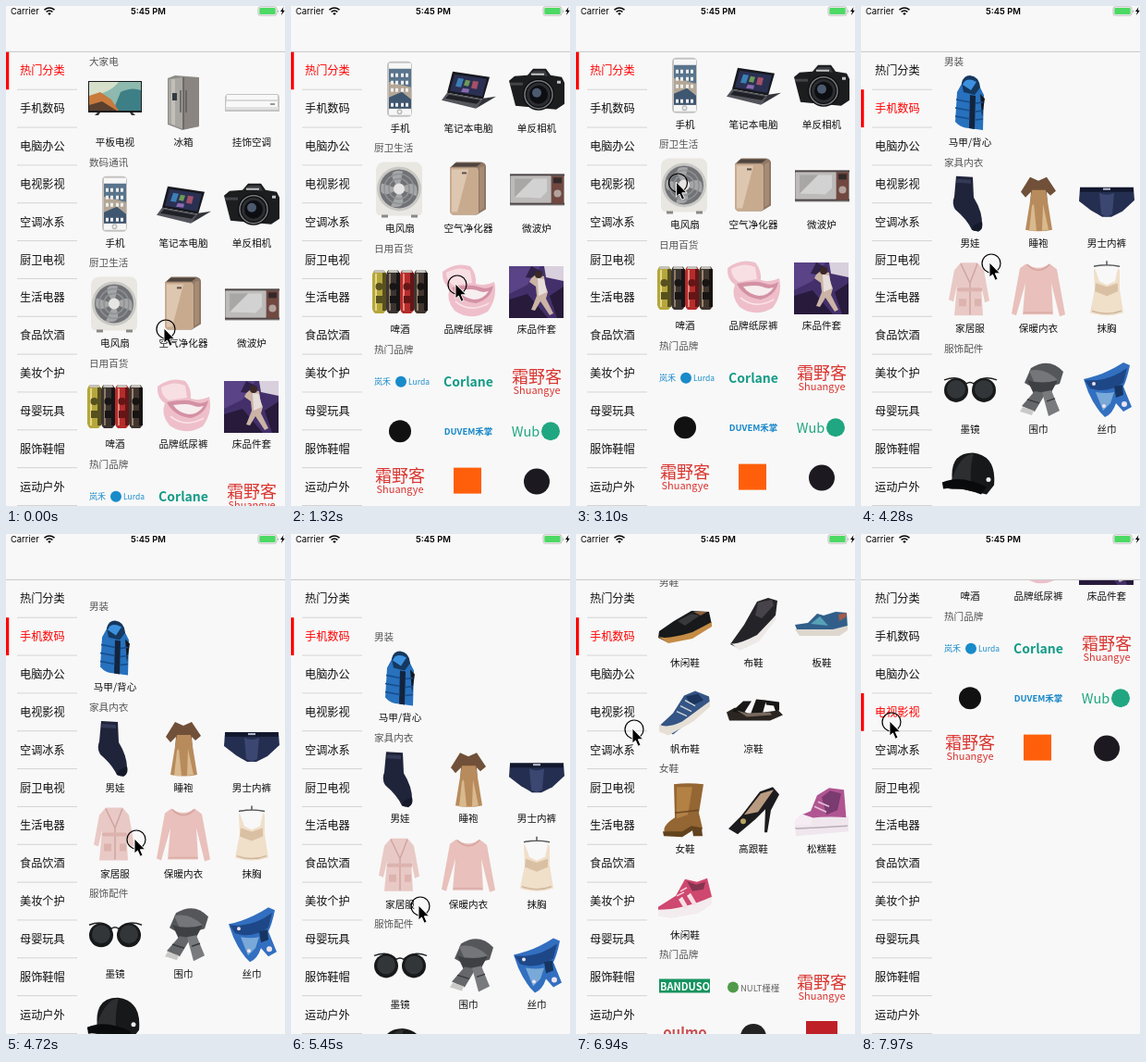
Write an HTML page that moves like this. It is 302 px wide and 540 px high and loops after 8000 ms.

```html
<!DOCTYPE html>
<html lang="zh">
<meta charset="utf-8">
<title>分类</title>
<style>
html, body { margin: 0; height: 100%; overflow: hidden; background: #f8f8f8 }
svg { display: block; width: 100vw; height: 100vh }
text { font-family: "Noto Sans CJK SC", "Noto Sans CJK", sans-serif }
.bar { font: 9.4px Inter, sans-serif }
</style>
<svg id="stage" viewBox="0 0 302 540">
  <clipPath id="clip"><path d="M78 50H302V540H78Z"/></clipPath>
  <g clip-path="url(#clip)"><g id="lists"></g></g>
  <g id="side"></g>
  <path d="M0 49.4H302" stroke="#b9b9b9" stroke-width=".8"/>
  <text class="bar" x="5" y="8.8">Carrier</text>
  <path d="M41.5 4.2Q47 -.3 52.5 4.2M43.6 6.4Q47 3.6 50.4 6.4" fill="none" stroke="#000" stroke-width="1.5"/>
  <path d="M45.2 8Q47 6.6 48.8 8L47 10Z"/>
  <text class="bar" x="154" y="8.8" text-anchor="middle" style="font-weight:600">5:45 PM</text>
  <rect x="273" y=".8" width="20" height="9.4" rx="2.2" fill="#f8f8f8" stroke="#a5a5a5" stroke-width=".7"/>
  <rect x="274.3" y="2" width="17.4" height="7" rx="1" fill="#4cd964"/>
  <path d="M294.2 4V7.5Q296 5.7 294.2 4Z" fill="#999"/>
  <path d="M300.5 1L297 6H299L298 10L301.8 4.7H299.6Z"/>
  <g id="cursor">
    <circle r="10" fill="none" stroke="#000" stroke-width="1.2"/>
    <path d="M-2 -1V15L1.5 12L4.2 18.2L7 17L4.3 10.8H9.5Z" stroke="#fff" stroke-width=".9"/>
  </g>
</svg>
<script>
const $ = id => document.getElementById(id);
const dot = (x, y, r) => `M${x - r} ${y}a${r} ${r} 0 1 0 ${2 * r} 0a${r} ${r} 0 1 0 ${-2 * r} 0Z`;
const box = (x, y, w, h) => `M${x} ${y}h${w}v${h}h${-w}Z`;
const text = (x, y, size, str, fill = '#111', anchor = 'middle', more = '') =>
  `<text x="${x}" y="${y + size * .37}" font-size="${size}" fill="${fill}" text-anchor="${anchor}" ${more}>${str}</text>`;
// A shape is "colour path"; "~colour" strokes instead of filling.
const shape = s => {
  const [, line, color, d] = s.match(/^(~?)(\S+) (.*)$/);
  return line ? `<path d="${d}" fill="none" stroke="${color}" stroke-width="1.5"/>` : `<path d="${d}" fill="${color}"/>`;
};

const can = (x, color, dark, light) => [`${color} M${x} -17Q${x + 1} -21 ${x + 3} -22H${x + 12}Q${x + 14} -21 ${x + 15} -17V20Q${x + 14} 24 ${x + 12} 25H${x + 3}Q${x + 1} 24 ${x} 20Z`,
  `${dark} ${box(x + 11, -19, 4, 41)}`, `${light} ${box(x + 3, -18, 2, 40)}`,
  `#c4c2bd M${x + 3} -22H${x + 12}L${x + 13} -19H${x + 2}Z`, `${dark} ${dot(x + 7.5, -4, 4)}${box(x + 4, 6, 7, 8)}`];

const art = {
  平板电视: ['#1b1b1e ' + box(-29, -24, 58, 34), '#8db9ae ' + box(-28, -23, 56, 31), '#d5dfc9 M-28 -23H4Q-6 -10 -28 -8Z',
    '#3d7f86 M6 -12Q18 -18 28 -14V8H-2Z', '#c87a3c M-28 -8L-16 -12L-4 -4L4 8H-28Z', '#59402f M-28 2L-14 -2L2 8H-28Z', '#333 M-19 10H-16L-18 13H-22ZM16 10H19L22 13H18Z'],
  冰箱: ['#8c8b89 M-17 -27L-9 -30L17 -28V25L-1 29L-17 23Z', '#aaa6a1 M-16 -26L0 -28V28L-16 22Z', '#8a8580 M1 -28L17 -27V25L1 28Z',
    '#c2beb8 M-13 -26H-9V24L-13 22Z', '~#5d5c5b M0 -28V28M-3 -14V10M3 -14V10', '#343a40 ' + box(-12, -11, 5, 8)],
  挂饰空调: ['#c4c4c4 M-27 -10H28Q30 -9 30 -6V9H-29V-7Z', '#f8f8f8 M-27 -9H28V4H-28Z', '#e0e0e0 M-28 4H29V7H-28Z', '~#cfcfcf M-28 -3H29', '#999 ' + box(20, 0, 5, 2)],
  手机: ['#c5c3c1 M-9 -30H8Q13 -30 13 -25V25Q13 30 8 30H-9Q-14 30 -14 25V-25Q-14 -30 -9 -30Z', '#f7f7f7 ' + box(-12, -28, 24, 56),
    '#59748c ' + box(-12, -22, 24, 43), '#b3a695 M-12 -8L12 -2V21H-12Z', '#3f5670 M-12 9L2 3L12 11V21H-12Z',
    '#eee ' + [-17, -9, -1, 15].map(y => [-10, -5, 1, 6].map(x => box(x, y, 3, 4)).join('')).join(''),
    '~#bbb ' + dot(-.5, 24.5, 2.2)],
  笔记本电脑: ['#17181d M-17 -19L23 -13L16 11L-23 4Z', '#2a3052 M-15 -16L20 -11L15 8L-20 2Z',
    '#3b7fb5 M-11 -12L-5 -11L-8 -2L-14 -3Z', '#6f9a58 M-3 -10L2 -9L0 -3L-5 -4Z', '#a4506a M5 -9L11 -8L9 0L3 -1Z', '#8a6ab0 M-6 -1L1 0L0 4L-8 3Z',
    '#55565d M-23 4L16 11L8 21L-29 12Z', '#202127 M-21 6L13 12L9 16L-25 10Z', '#33343b M16 10L30 8L8 21Z'],
  单反相机: ['#1c1d1f M-30 -9L-24 -14L-10 -15L-4 -22H10L15 -15L27 -13L30 -7V16L21 22L-23 18Z', '#3b3c40 M-8 -16L-3 -20H9L12 -14Z', '#434449 M-29 -7H-15V-4H-29Z',
    '#0b0c0d ' + dot(2, 6, 17), '~#77797d ' + dot(2, 6, 15), '#2b2d31 ' + dot(2, 6, 13), '#0d0e11 ' + dot(2, 6, 10), '#4c5a70 ' + dot(0, 4, 5), '#c4c4c4 ' + box(-6, -17, 14, 2) + box(22, -9, 4, 3)],
  电风扇: ['#e9e7e2 M-18 -30H18Q24 -28 24 -22V22Q24 28 19 28H-20Q-26 28 -26 22V-22Q-25 -29 -18 -30Z', '#c9c8c4 ' + dot(-1, -1, 24), '#707275 ' + dot(-1, -1, 21),
    '#a5a6a8 M-1 -1Q-18 -23 3 -20ZM-1 -1Q22 -15 18 7ZM-1 -1Q11 22 -10 18ZM-1 -1Q-25 13 -20 -7Z', '~#8f9194 ' + dot(-1, -1, 16) + dot(-1, -1, 11), '#e6e5e3 ' + dot(-1, -1, 6),
    '#8a8987 ' + box(-20, 27, 7, 3) + box(12, 27, 7, 3)],
  空气净化器: ['#8f7764 M-20 -24L-13 -30H14Q19 -29 19 -25V21L9 27H-17L-20 23Z', '#c8ab8f M-20 -24H8Q11 -24 11 -20V25L8 27H-17Q-20 26 -20 23Z',
    '#ddc7b1 M-18 -22H0L-12 24H-18Z', '#4f453f M-14 -29H14L9 -25H-18Z', '#a58a74 M12 -24L17 -26V20L12 23Z', '#5d4f45 ' + box(-7, -19, 5, 2)],
  微波炉: ['#9a9696 ' + box(-29, -17, 59, 34), '#4c4444 M-29 -17H30V-15H-29ZM-29 14H30V16H-29Z', '#bdbaba ' + box(-28, -15, 43, 29),
    '#d3d2d2 M-24 8L-4 -12H11V2L4 9Z', '#a9a6a6 M-24 -12H-4L-24 8Z', '#71483f ' + box(16, -15, 13, 30), '#33292a ' + box(18, -13, 9, 6), '#b2a29d ' + dot(22.5, 4, 4)],
  啤酒: [can(-30, '#b5a63c', '#57501f', '#e2d885'), can(-15, '#3a3431', '#171515', '#8f7b66'), can(0, '#b52c2b', '#641617', '#e28a7e'), can(15, '#40352f', '#171412', '#9a856e')].flat(),
  品牌纸尿裤: ['#eebfca M-28 -20Q-14 -31 2 -26Q9 -18 8 -7Q18 -4 28 -9Q32 8 21 23Q2 34 -15 22Q-25 10 -20 -2Q-29 -8 -28 -20Z', '#f8dfe4 M-24 -19Q-10 -27 2 -21L4 -8L-16 -5Q-24 -10 -24 -19Z',
    '#d391a4 M-18 -3Q2 -7 10 -4Q20 0 27 -5Q24 10 8 14Q-10 12 -18 -3Z', '#f7eef0 M-11 0Q4 -2 9 0Q15 3 22 1Q16 10 6 10Q-6 8 -11 0Z', '~#fae6eb M-14 12Q2 25 22 14'],
  床品件套: ['#43306b ' + box(-30, -26, 59, 56), '#5a4386 M-30 -26H4L-10 -6L-30 4Z', '#271a3b M-30 10L-10 4L12 30H-30ZM14 6L29 -4V30H22Z', '#2f2148 M-6 -26L6 -20L2 -12L-12 -14Z',
    '#d8d0dc M8 -26H29V-10L10 -14Z', '#cbb3a5 M-6 -13L-1 -17L8 -15L9 -6L12 2L10 9L18 25L14 27L4 12L-2 22L-6 21L0 6L-1 -4L-8 -9Z', '#e6dedb M1 -13L8 -12L11 2L2 6Z', '#3a2826 ' + dot(2, -17, 4)],
  '马甲/背心': ['#2771be M-8 -23L-14 -12L-16 20Q-10 27 -1 27L14 29L15 -9L9 -21Z', '#15385f M-9 -22Q-7 -30 0 -30Q10 -29 11 -17L5 -9L-7 -12Z', '#3c91df M-8 -20Q-4 -29 7 -23L1 -14Z',
    '#13243d M0 -9L6 -8L5 28L-1 27Z', '#15191f M11 -10L16 -5L13 15Z', '~#164c8c M-15 -4L0 -1M-16 5L0 8M-16 14L0 17M6 0L14 -1M6 9L14 8M6 18L14 17'],
  男娃: ['#20243a M-15 -30L3 -29L4 -7Q14 9 13 24Q9 32 2 28Q-3 17 -16 6Q-20 0 -17 -8Z', '#343a56 M-14 -27L1 -26V-22L-15 -23Z', '#151929 M4 23L13 19Q15 27 9 30L2 28Z'],
  睡袍: ['#705038 M-9 -29L0 -25L9 -29L19 -14L13 -9L9 -13L10 1H-9L-8 -13L-14 -7L-19 -13Z', '#b88b5c M-7 -15H8L15 28Q0 31 -14 28Z', '#d9b98e M-5 0L-2 29H-10L-7 2ZM5 0L11 28L4 29Z'],
  男士内裤: ['#242e50 M-29 -17H29L30 -4L17 8L5 14H-5L-17 7L-30 -3Z', '#12182e M-29 -18H29V-13H-29Z', '#3b4770 M-8 -12Q0 -8 8 -12L6 11L0 14L-6 11Z', '#b9bdd0 ' + box(-4, -17, 8, 2)],
  家居服: ['#e9c9c5 M-10 -29H8L15 -21L21 12L16 14L12 -5L14 28H-17L-14 -5L-18 13L-23 11L-17 -21Z', '~#cfa5a0 M-10 -28L0 -7L8 -28M-14 0H12M0 -7V27', '#dcb3ae ' + box(-13, -2, 26, 4) + box(-12, 10, 8, 8) + box(5, 10, 7, 8)],
  保暖内衣: ['#e9c0bb M-13 -28Q0 -19 12 -28L20 -22L29 27L23 29L14 -7L16 27H-17L-14 -7L-24 28L-29 26L-20 -23Z', '~#d5a29d M-12 -27Q0 -15 12 -27', '~#d9aba6 M-16 25H15'],
  抹胸: ['~#555 M-14 -25Q0 -28 14 -25M0 -26V-31', '#f0dfc9 M-13 -23L-8 -9L0 -5L9 -9L12 -23L14 -21L14 0L18 25Q0 31 -18 25L-13 0L-14 -21Z', '#dac0a3 M-12 -7L0 -3L12 -7L12 2L0 7L-13 2Z', '~#cfb79d M-16 23Q0 29 16 23'],
  墨镜: ['~#222 M-28 -11Q-12 -17 -4 -7Q0 -10 4 -7Q14 -17 29 -11', '#17191a ' + dot(-15, 0, 13), '#17191a ' + dot(15, 0, 13), '#323638 ' + dot(-15, -1, 10), '#323638 ' + dot(15, -1, 10)],
  围巾: ['#55565a M-8 -24Q12 -36 27 -20L23 -7L-1 0L-15 -8Z', '#75767a M-10 -21Q7 -25 22 -10L-2 -3Z', '#3e4043 M-12 -11Q4 -6 21 -11L13 4L-5 4Z', '#66676a M-4 1L8 3L-4 23L-18 17Z',
    '#797a7d M4 2L14 0L23 22L11 28Z', '#c9c9c8 M-17 18L-5 22L-7 27L-20 23Z', '~#38393c M-12 10L1 14M9 12L18 9'],
  丝巾: ['#326fc0 M-25 -12Q-4 -16 18 -30L25 -27Q22 -12 18 -4L27 18L18 23L10 14Q6 26 -2 29Q-12 20 -20 2Z', '#1e4787 M-24 -11Q0 -8 22 -24L18 -8Q0 4 -18 -2Z', '#79a9d8 M-12 2Q0 4 8 2L4 14L-4 22Z',
    '#eee3ec ' + dot(-14, -7, 2) + dot(19, 15, 3) + dot(-3, 17, 2), '#163561 M8 -4L17 -6L18 5L10 8Z'],
  帽子: ['#171819 M-19 7Q-23 -25 3 -25Q29 -22 26 10L18 20L-9 14Q-29 16 -30 7Z', '#2c2e30 M-17 -3Q-8 -24 4 -24Q0 -12 1 9Q-12 4 -22 10Z', '#090a0b M-30 7Q-10 -2 18 12L12 20Q-12 11 -29 14Z', '#eee ' + dot(20, 4, 2.5)],
  休闲鞋: ['#17191b M-28 8L-12 -3L7 -14L26 -13L29 1L6 13L-19 20L-29 15Z', '#c58c45 M-29 14Q-18 17 8 9L29 -2V3L8 16L-18 21Z', '#39393a M-8 -3L7 -11L16 -9L0 2Z', '#906139 M9 -13L24 -13L17 -9Z'],
  布鞋: ['#242428 M-25 22L-10 1L4 -24L16 -28L26 -25L24 -9L4 16L-15 27Z', '#ece9e7 M-24 21Q-17 23 4 12L24 -9V-4L6 19L-15 29Z', '#47434a M5 -23L20 -26L22 -20L9 -6L2 -9Z'],
  板鞋: ['#315f8a M-29 1L-15 -1L-5 -11L2 -9L15 -13L27 -12L28 4L19 11H-25Z', '#ddd7ce M-29 6H12L28 2V7L19 13H-24Z', '#57a1b7 M-12 0L-2 -8L7 2Z', '#a05c4a M18 -10L27 -12L26 -7L19 -3Z'],
  帆布鞋: ['#345585 M-28 18L-13 4L-1 -15L11 -20L26 -14L27 -6L12 7L-13 27Z', '#e5dfd5 M-28 16Q-20 21 -3 13L27 -9V-3L9 13L-18 28L-28 24Z', '#1b345d M1 -14L14 -17L20 -10L7 -4Z', '~#d0d5db M-9 2L2 7M-5 -4L7 2M0 -10L11 -4'],
  凉鞋: ['#2a2521 M-29 3L-20 -2L-4 5L27 1L32 6L18 12H-26Z', '#181716 M-23 2L-11 -9H-2L-11 5ZM-3 5L3 -11L14 -10L10 4ZM13 -10L28 -8L28 1L24 2L22 -4L14 -5Z', '#77695d M-18 1L-7 4L18 3L20 6L-7 8Z'],
  女鞋: ['#946633 M-12 -28Q3 -30 20 -28L15 3L19 20L15 25L8 20L-3 25L-21 26Q-27 18 -11 8Z', '#62431f M-24 23L-3 23L7 17L18 19L19 28H9L8 22L-3 29L-23 28Z', '#b48145 M-9 -25H8L3 5L-9 9Z', '~#6c4825 M-11 3L15 0'],
  高跟鞋: ['#1c1b1e M-27 20L-13 6L7 -20L21 -25L28 -17L19 0L15 24H12L13 -1L2 10L-17 26Z', '#b89b80 M-10 5L8 -18L22 -22L5 2Z', '#b6a465 ' + dot(-11, 12, 3)],
  松糕鞋: ['#b05591 M-5 -16L8 -24L24 -22L27 15L-29 20L-24 6L-12 1Z', '#efe7ed M-29 12Q-5 5 29 8V23L-28 28Z', '#793b70 M0 -14L9 -21L21 -18L17 0L5 5Z', '#f5edf3 M-29 11L-22 4L-10 8L-12 16H-28Z', '~#e7c1da M-4 -9L8 -4M-8 -4L5 2', '~#b9afb7 M-28 20L28 17'],
  '休闲鞋*': ['#cf486f M-29 12L-10 0L0 -18L13 -15L24 -19L29 1L20 15L-12 23L-29 21Z', '#f3ecef M-29 15Q-2 15 29 1V9L14 19L-16 24L-29 22Z', '#f7dfe6 M-7 4L-3 1L4 13L-1 14ZM2 0L6 -3L13 9L9 11Z', '#84354f M2 -16L12 -12L22 -15L20 -7L8 -5Z', '~#f5d4de M-9 0L-1 -4M-5 -5L2 -9']
};

const word = (x, y, size, str, fill, more = 'font-weight="700"') => text(x, y, size, str, fill, 'middle', more);
const frost = word(0, -5, 18, '霜野客', '#d9342f', 'font-weight="500"') + word(0, 9, 11, 'Shuangye', '#d9342f', '');
const brands = {
  lurda: text(-28, 0, 9, '岚禾', '#198bc9', 'start') + shape('#198bc9 ' + dot(1, 0, 6)) + text(9, 0, 8.5, 'Lurda', '#198bc9', 'start'),
  corlane: word(0, 0, 14, 'Corlane', '#159b87'),
  frost,
  black: shape('#111 ' + dot(0, 0, 12)),
  duvem: word(0, 0, 9.5, 'DUVEM禾掌', '#1787c9'),
  wub: word(-12, 0, 14.5, 'Wub', '#20a680', '') + shape('#20a680 ' + dot(15, 0, 10)),
  orange: shape('#ff5f0a ' + box(-16, -14, 30, 28)),
  dark: shape('#1c1a20 ' + dot(0, 1, 14)),
  banduso: shape('#16935f ' + box(-28, -9, 55, 15)) + word(0, -1, 11, 'BANDUSO', '#fff'),
  nult: shape('#4f9a49 ' + dot(-22, 0, 6)) + text(-14, 1, 9.5, 'NULT槿槿', '#666', 'start'),
  oulmo: word(0, -4, 15, 'oulmo', '#c84d50'),
  ink: shape('#222 ' + dot(0, 0, 14)),
  red: shape('#bf2028 ' + box(-17, -17, 34, 34))
};

const lists = ['大家电:平板电视 冰箱 挂饰空调|数码通讯:手机 笔记本电脑 单反相机|厨卫生活:电风扇 空气净化器 微波炉|日用百货:啤酒 品牌纸尿裤 床品件套|热门品牌:lurda corlane frost black duvem wub frost orange dark',
  '男装:马甲/背心|家具内衣:男娃 睡袍 男士内裤 家居服 保暖内衣 抹胸|服饰配件:墨镜 围巾 丝巾 帽子|男鞋:休闲鞋 布鞋 板鞋 帆布鞋 凉鞋|女鞋:女鞋 高跟鞋 松糕鞋 休闲鞋*|热门品牌:banduso nult frost oulmo ink red'];

function build(list) {
  let y = 60, out = '';
  for (const part of list.split('|')) {
    const [title, names] = part.split(':');
    let last = y;
    out += text(90, y, 10.6, title, '#555', 'start');
    names.split(' ').forEach((name, i) => {
      const x = 118 + i % 3 * 74, row = Math.floor(i / 3), brand = brands[name];
      last = y + 87 + row * 92.5;
      const cy = brand ? y + 35 + row * 53.4 : last - 42;
      out += `<g transform="translate(${x} ${cy})">${brand || art[name].map(shape).join('')}</g>`;
      if (!brand) out += text(x, last, 10.6, name.replace('*', ''));
    });
    y = last + 21.7;
  }
  return `<g>${out}</g>`;
}
$('lists').innerHTML = lists.map(build).join('');

const ROW = 40.84, rowY = i => 49.4 + i * ROW;
$('side').innerHTML = '热门分类 手机数码 电脑办公 电视影视 空调冰系 厨卫电视 生活电器 食品饮酒 美妆个护 母婴玩具 服饰鞋帽 运动户外'.split(' ').map((name, i) =>
  `<path d="M12 ${rowY(i + 1)}H77" stroke="#cbcbcb" stroke-width=".8"/>` + text(15, rowY(i) + 20.5, 12.2, name, '#111', 'start')).join('') +
  `<rect id="mark" width="3.2" height="${ROW}" fill="#f00"/>`;
const rows = [...$('side').querySelectorAll('text')];

// Keys are [step, value...]; one step is STEP ms.
const STEP = 147.5;
const pointer = [[0, 173, 349], [2, 181, 381], [3, 181, 381], [7, 180, 300], [9, 180, 301], [11, 196, 332], [15, 201, 306], [18, 200, 285], [19, 190, 270], [23, 31, 112],
  [25, 31, 112], [29, 141, 278], [30, 141, 290], [35, 141, 390], [36, 141, 390], [37, 140, 402], [40, 145, 400], [43, 150, 240], [44, 148, 230], [47, 63, 211], [52, 33, 203]];
const scroll = [[0, 0], [3, 0], [5, 45], [7, 105], [9, 124], [12, 124], [15, 137.5], [18, 146], [19, 146], [21, 128], [23, 124], [25, 124], [27, 0],
  [30, 0], [35, -46], [36, -46], [37, -51.5], [38, -25], [39, -6], [40, 0], [42, 190], [44, 390], [47, 519], [49, 541], [52, 549], [53, 549], [54, 406]];

function at(keys, s) {
  const i = keys.findIndex(k => k[0] > s);
  if (i < 0) return keys[keys.length - 1].slice(1);
  const a = keys[i - 1], b = keys[i], u = (s - a[0]) / (b[0] - a[0]);
  return a.slice(1).map((v, j) => v + (b[j + 1] - v) * u);
}

function draw(now) {
  const s = Math.floor((now % 8000 + 10) / STEP);
  const pick = s < 25 ? 0 : s < 53 ? 1 : 3;
  const shown = pick === 1 ? 1 : 0;
  [...$('lists').children].forEach((g, i) => g.setAttribute('display', i === shown ? 'inline' : 'none'));
  $('lists').setAttribute('transform', `translate(0 ${-at(scroll, s)[0]})`);
  $('mark').setAttribute('y', rowY(pick));
  rows.forEach((r, i) => r.setAttribute('fill', i === pick ? '#f00' : '#111'));
  $('cursor').setAttribute('transform', `translate(${at(pointer, s).join(' ')})`);
}
const start = performance.now();
(function tick() {
  draw(performance.now() - start);
  requestAnimationFrame(tick);
})();
</script>
</html>
```
